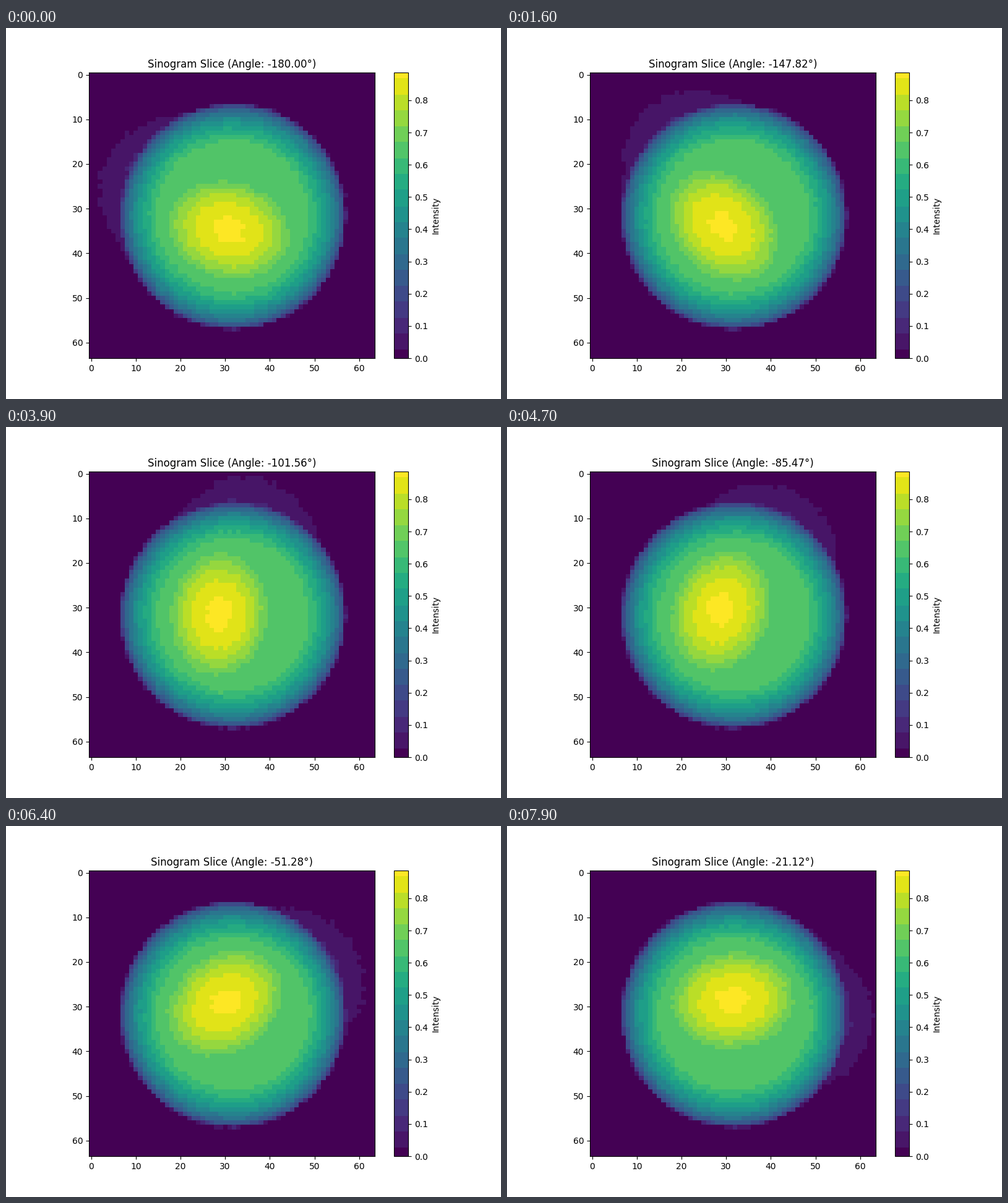
A matplotlib script for the animation above (8 s loop, 800 px wide and 600 px high).

```python
import numpy as np
import matplotlib.pyplot as plt
from matplotlib.animation import FuncAnimation
from matplotlib.colors import ListedColormap

FRAMES, INTERVAL = 80, 100
SIZE = 64
VMAX, STEP = 0.8863, 0.0497
ANGLES = np.linspace(-180, 180, 180)

Y, X = np.mgrid[:SIZE, :SIZE] - 31.75
RADIUS = np.hypot(X, Y)


def stepped_viridis():
    """Viridis reduced to evenly spaced flat bands."""
    v = np.linspace(0, VMAX, 256)
    bands = np.round(v / STEP) * STEP / VMAX
    return ListedColormap(plt.get_cmap("viridis")(np.clip(bands, 0, 1)))


def paraboloid(direction, dist, radial, tangential, height):
    """Rounded lump at a polar position, aligned with its own radius."""
    a = np.radians(direction)
    u = X * np.cos(a) + Y * np.sin(a) - dist
    w = Y * np.cos(a) - X * np.sin(a)
    return height * np.clip(1 - (u / radial) ** 2 - (w / tangential) ** 2, 0, 1)


def projection(i):
    turn = ANGLES[i] + 180
    rng = np.random.default_rng(100 + i)
    ball = 0.84 * np.sqrt(np.clip(1 - (RADIUS / 25.3) ** 2, 0, 1))
    ball = np.minimum(ball, 0.637)
    rim = 0.03 * np.exp(-((RADIUS - 25.1) / 0.9) ** 2)
    halo = paraboloid(202 + turn, 14.2, 19, 19, 0.12)
    core = paraboloid(104 + turn, 3.2, 11.5, 14.5, 0.245)
    img = np.hypot(ball + rim, halo) + core
    img += rng.normal(0, 0.0035, img.shape) * (img > 0)
    return np.clip(img, 0, VMAX)


fig, ax = plt.subplots(figsize=(8, 6), dpi=100)
image = ax.imshow(projection(0), cmap=stepped_viridis(), vmin=0, vmax=VMAX)
fig.colorbar(image, ax=ax, label="Intensity")
title = ax.set_title("")


def update(i):
    image.set_data(projection(i))
    title.set_text(f"Sinogram Slice (Angle: {ANGLES[i]:.2f}°)")
    return image, title


anim = FuncAnimation(fig, update, frames=FRAMES, interval=INTERVAL,
                     repeat=True, repeat_delay=0, blit=False)
plt.show()
```
